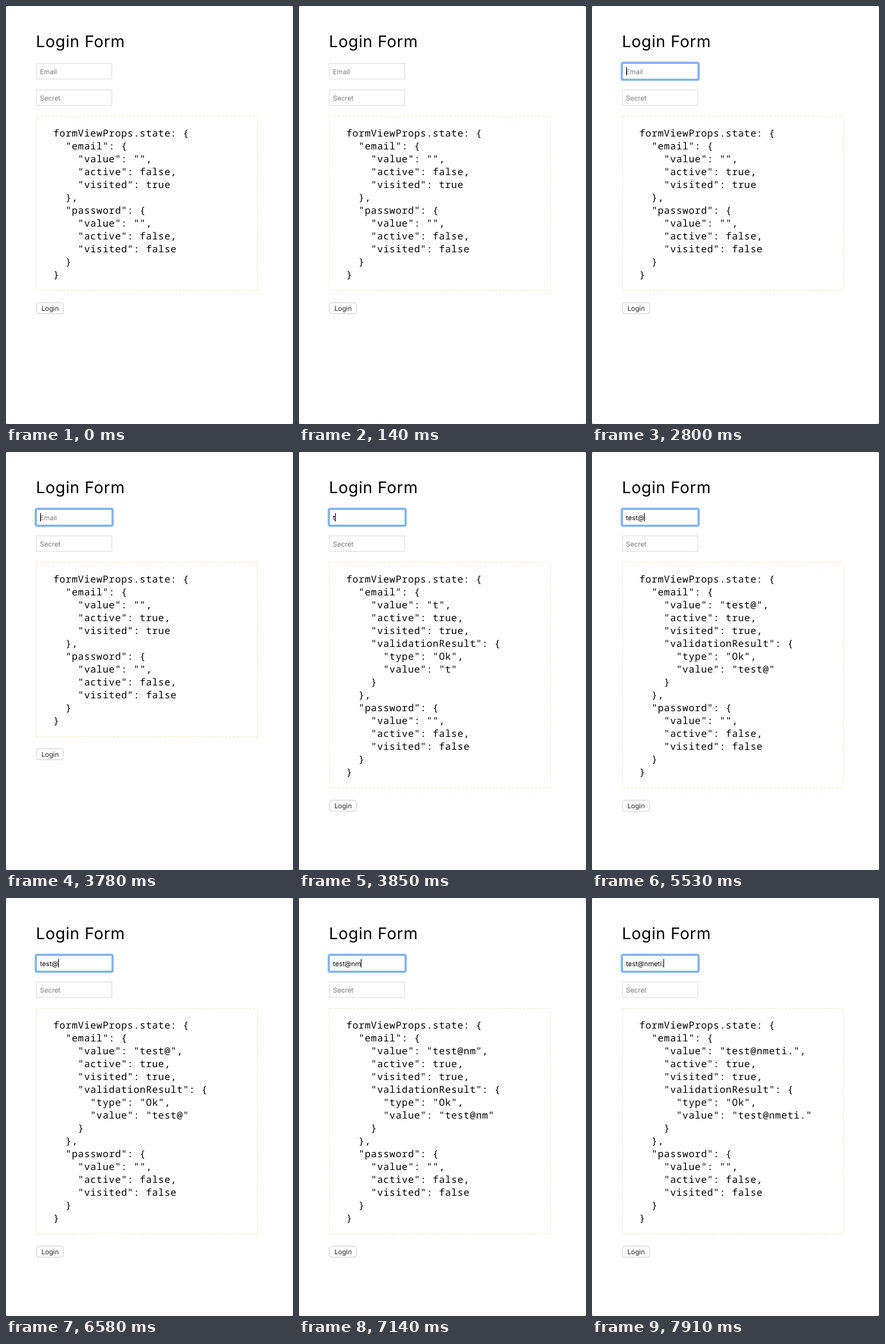
Write an HTML page that moves like this. It is 446x650 px and loops after 8 s.

```html
<!DOCTYPE html>
<html lang="en">
<head>
<meta charset="utf-8">
<title>Login Form</title>
<style>
  html, body { margin: 0; width: 100%; height: 100%; overflow: hidden; background: #fff; }
  svg { display: block; }
  text { font: 10.4px Inter, "Liberation Sans", sans-serif; font-optical-sizing: none; text-rendering: geometricPrecision; white-space: pre; }
  .title { font-size: 25px; letter-spacing: .55px; }
  .code { font: 450 15px "Noto Sans Mono", "DejaVu Sans Mono", monospace; letter-spacing: .6px; }
  .hint { fill: #757575; }
  .field { fill: #fff; stroke: #dedede; }
  .panel { fill: none; stroke: #efe9c9; stroke-dasharray: 4 2; }
  .ring rect { fill: none; }
</style>
</head>
<body>
<svg width="446" height="650" viewBox="0 0 446 650">
  <g fill="#8a8a8a">
    <rect width="1" height="1"/><rect x="445" width="1" height="1"/>
    <rect y="649" width="1" height="1"/><rect x="445" y="649" width="1" height="1"/>
  </g>
  <text class="title" x="46.6" y="64">Login Form</text>

  <rect class="field" x="47.5" y="89.5" width="117" height="24"/>
  <g class="ring" id="ring">
    <rect x="46" y="88" width="120" height="27" rx="2.5" stroke="#cfe2f8" stroke-width="4"/>
    <rect x="46.5" y="88.5" width="119" height="26" rx="2" stroke="#82b3ec" stroke-width="3"/>
  </g>
  <text class="hint" id="emailHint" x="52.8" y="106">Email</text>
  <text id="email" x="52.8" y="106"></text>
  <rect id="caret" y="95" width="1" height="13"/>

  <rect class="field" x="47.5" y="130.5" width="117" height="24"/>
  <text class="hint" x="52.8" y="147">Secret</text>

  <rect class="panel" id="panel" x="47.5" y="171.5" width="343"/>
  <text class="code" id="code"></text>

  <g id="button">
    <rect x="47.5" y="1" width="42" height="17" rx="4" fill="#c4c4c4" opacity=".6"/>
    <rect x="47.5" y=".5" width="42" height="17" rx="4" fill="#fff" stroke="#d2d2d2"/>
    <text x="54.9" y="13" fill="#222">Login</text>
  </g>
</svg>
<script>
  const LOOP = 8000, LINE = 20, ADDRESS = "test@nmeti.";
  // time, letters typed, focused, caret shown
  const STEPS = [
    [0, 0, false, false],
    [2800, 0, true, true], [3290, 0, true, false], [3780, 0, true, true],
    [3850, 1, true, true], [4130, 2, true, true], [4410, 3, true, true],
    [4550, 4, true, true], [5110, 4, true, false],
    [5530, 5, true, true], [6090, 5, true, false], [6580, 5, true, true],
    [7000, 6, true, true], [7140, 7, true, true], [7280, 8, true, true],
    [7420, 9, true, true], [7700, 10, true, true], [7910, 11, true, true]
  ];

  const el = id => document.getElementById(id);
  const show = (id, on) => el(id).setAttribute("visibility", on ? "visible" : "hidden");

  function stateLines(value, active) {
    const email = { value, active, visited: true };
    if (value) email.validationResult = { type: "Ok", value };
    const password = { value: "", active: false, visited: false };
    return ("formViewProps.state: " + JSON.stringify({ email, password }, null, 2)).split("\n");
  }

  function drawCode(lines) {
    el("code").replaceChildren(...lines.map((line, i) => {
      const span = document.createElementNS("http://www.w3.org/2000/svg", "tspan");
      span.setAttribute("x", 73.4);
      span.setAttribute("y", 203 + i * LINE);
      span.textContent = line;
      return span;
    }));
    const height = 31 + lines.length * LINE;
    el("panel").setAttribute("height", height);
    el("button").setAttribute("transform", `translate(0 ${190 + height})`);
  }

  function render([, typed, focused, caret]) {
    const value = ADDRESS.slice(0, typed);
    el("email").textContent = value;
    show("emailHint", !value);
    show("ring", focused);
    show("caret", caret);
    const width = value ? el("email").getComputedTextLength() : 0;
    el("caret").setAttribute("x", Math.round(52.8 + width));
    drawCode(stateLines(value, focused));
  }

  const start = performance.now();
  let current;
  function tick() {
    const t = (performance.now() - start) % LOOP;
    const step = STEPS.findLast(s => s[0] <= t) || STEPS[0];
    if (step !== current) render(current = step);
    requestAnimationFrame(tick);
  }
  tick();
</script>
</body>
</html>
```
